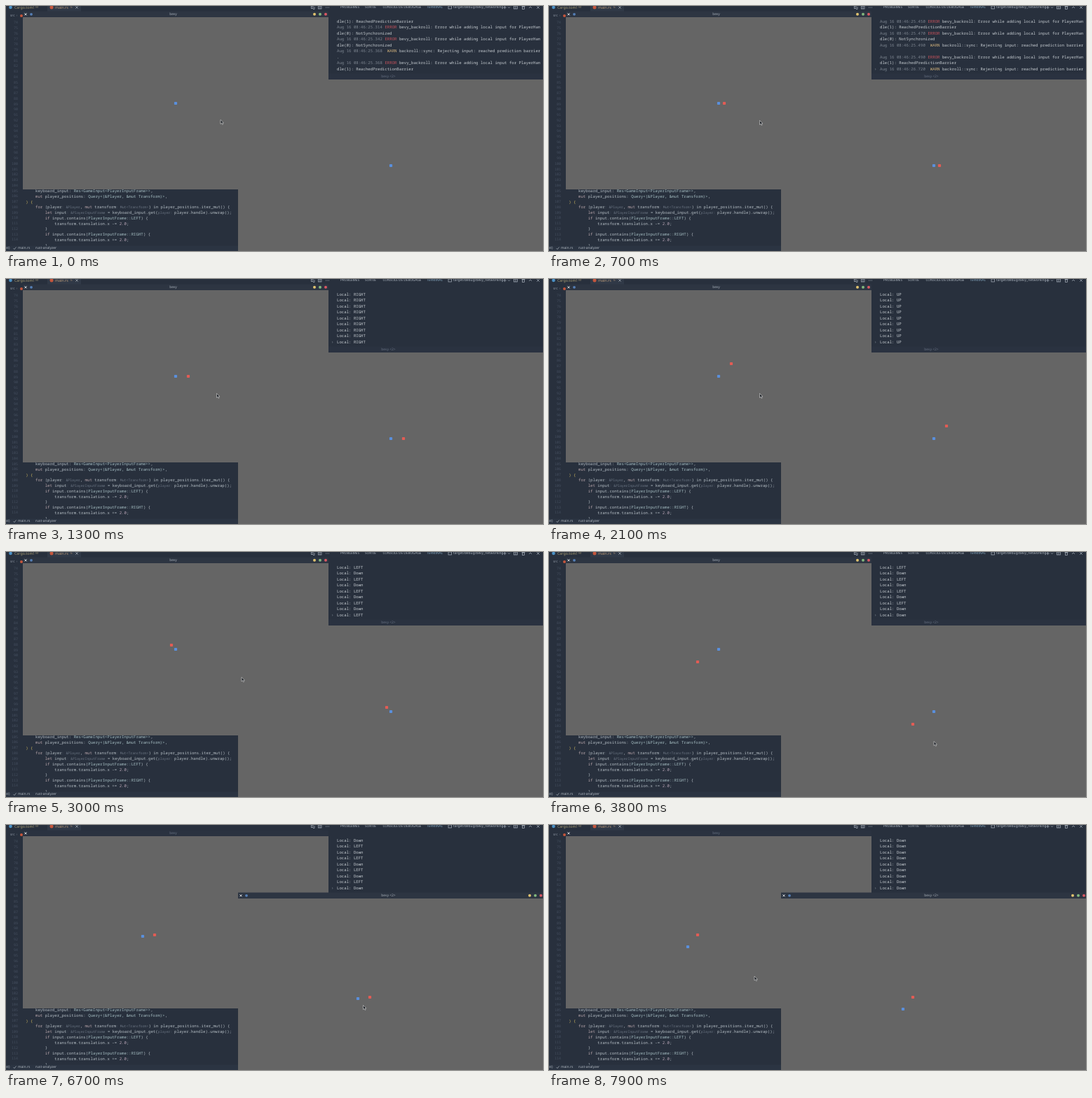
Recreate the animation shown at these times as an HTML page with a canvas. Size 766 by 350 pixels, loop 8 s.

```html
<!DOCTYPE html>
<html lang="en">
<head>
<meta charset="utf-8">
<title>Rollback demo</title>
<style>
html, body { margin: 0; width: 100%; height: 100%; overflow: hidden; background: #28303d; }
canvas { display: block; width: 766px; height: 350px; }
</style>
</head>
<body>
<canvas id="stage"></canvas>
<script>
const W = 766, H = 350, LOOP = 8000, STEP = 100, RAISE = 4000;
const MONO = '"Noto Sans Mono", "DejaVu Sans Mono", monospace';
const SANS = '"Noto Sans", "Open Sans", sans-serif';
const CHAR = 3.42, SIZE = 5.69, HINT = 4.83;
const RED = '#e25c55', BLUE = '#5a8fdc', GRAY = '#656565';
const BG = '#28303d', BAR = '#2a3240', TEXT = '#b4bdc4', DIM = '#6d7785';

const canvas = document.getElementById('stage');
const scale = window.devicePixelRatio || 1;
canvas.width = W * scale;
canvas.height = H * scale;
const ctx = canvas.getContext('2d');
ctx.scale(scale, scale);
ctx.textBaseline = 'middle';
if ('textRendering' in ctx) ctx.textRendering = 'geometricPrecision';

function rect(x, y, w, h, color) {
  ctx.fillStyle = color;
  ctx.fillRect(x, y, w, h);
}
function disc(x, y, r, color) {
  ctx.fillStyle = color;
  ctx.beginPath();
  ctx.arc(x, y, r, 0, 7);
  ctx.fill();
}
function text(str, x, y, color, size = SIZE, family = MONO, align = 'left') {
  ctx.font = size + 'px ' + family;
  ctx.textAlign = align;
  ctx.fillStyle = color;
  ctx.fillText(str, x, y);
}
function label(str, x, y, color, size = 4.7) {
  text(str, x, y, color, size, SANS);
}
function line(points, color, width = 0.7) {
  ctx.strokeStyle = color;
  ctx.lineWidth = width;
  ctx.beginPath();
  points.forEach(([x, y]) => ctx.lineTo(x, y));
  ctx.stroke();
}
function box(x, y, w, h, color) {
  ctx.strokeStyle = color;
  ctx.lineWidth = 0.7;
  ctx.strokeRect(x, y, w, h);
}
function cross(x, y, r, color, width) {
  line([[x - r, y - r], [x + r, y + r]], color, width);
  line([[x - r, y + r], [x + r, y - r]], color, width);
}

// Linear interpolation over [time, ...values] keys
function track(keys, t) {
  let i = 0;
  while (i < keys.length - 2 && t >= keys[i + 1][0]) i++;
  const [a, b] = [keys[i], keys[i + 1]];
  const k = Math.min(1, Math.max(0, (t - a[0]) / (b[0] - a[0])));
  return a.slice(1).map((v, j) => v + (b[j + 1] - v) * k);
}

const redPath = [
  [500, 242, 139], [800, 254, 139], [1100, 254, 139], [1250, 260, 139],
  [1650, 260, 139], [2100, 260, 121], [2400, 260, 121], [2700, 248, 121], [3600, 212, 157]
];
const bluePath = [
  [5000, 242, 139], [5350, 242, 153], [5400, 240, 155],
  [6400, 199, 155], [6500, 195, 159], [7200, 195, 159], [7300, 198, 159], [7700, 198, 174]
];
const cursorPath = [
  [0, 306, 162.5], [400, 300.5, 163.5], [2900, 300.5, 163.5], [3600, 549, 270.5],
  [4100, 549, 270.5], [4600, 509.5, 257.5], [7200, 509.5, 257.5], [7800, 293, 216]
];

// Terminal history
const log = [], marks = [];
const add = (count, ...lines) => { for (let i = 0; i < count; i++) log.push(...lines); };
const mark = time => marks.push([time, log.length]);
const stamp = ms => 'Aug 16 08:46:' + (25 + ms / 1000).toFixed(3) + ' ';
const states = ['NotSynchronized', 'ReachedPredictionBarrier'];
const tail = p => `dle(${p}): ${states[p]}`;
const fail = (ms, p) => add(1,
  [stamp(ms), 'ERROR', ' bevy_backroll: Error while adding local input for PlayerHan'], tail(p));
const warn = ms => add(1,
  [stamp(ms), ' WARN', ' backroll::sync: Rejecting input: reached prediction barrier']);
const press = (count, ...keys) => add(count, ...keys.map(k => 'Local: ' + k));

add(1, tail(1));
fail(314, 0); fail(342, 0); warn(368); add(1, '.'); fail(368, 1);
mark(0);
for (let ms = 394; ms < 440; ms += 26) { fail(ms, 0); warn(ms + 12); add(1, '.'); fail(ms + 12, 1); }
fail(450, 1); fail(470, 0); warn(490); add(1, ''); fail(490, 1);
mark(400);
warn(1720);
mark(600);
mark(1100);
press(9, 'RIGHT');
mark(1300);
mark(1600);
press(27, 'UP');
mark(2100);
mark(2400);
press(17, 'LEFT');
mark(2700);
press(52, 'LEFT', 'Down'); press(1, 'Down');
mark(3600);
mark(5000);
press(20, 'Down');
mark(5300);
press(3, 'LEFT', 'Down');
mark(5400);
press(60, 'LEFT');
mark(6400);
press(6, 'LEFT', 'Down');
mark(6500);
mark(7200);
press(4, 'RIGHT');
mark(7300);
press(22, 'Down');
mark(7700);

function terminal(t) {
  const end = Math.floor(track(marks, t)[0]);
  log.slice(end - 9, end).forEach((row, i) => {
    const y = 22 + i * 8.5;
    if (typeof row === 'string') return text(row, 472, y, '#c5cbd0');
    const [time, level, rest] = row;
    text(time, 472, y, '#7d8590');
    text(level, 472 + 20 * CHAR, y, level === 'ERROR' ? '#c8525c' : '#d2b27c');
    text(rest, 472 + 25 * CHAR, y, '#c5cbd0');
  });
  if (t >= 600) text('›', 464, 90, '#8b95a0');
}

// Code row made of [string, color, size] runs
function code(row, indent, ...runs) {
  let x = 28.3 + indent * CHAR;
  const y = 264.5 + row * 7.75;
  for (const [str, color = TEXT, size = SIZE] of runs) {
    text(str, x, y, color, size);
    x += str.length * CHAR * size / SIZE;
  }
}
const KEY = '#b5a3a9', TYPE = '#a5bdc2', YELLOW = '#c9b45e', NUM = '#b8a5b6';
const hint = str => [str, DIM, HINT];

function editor() {
  rect(0, 0, W, H, BG);
  for (let i = 0; i < 41; i++) {
    text(String(74 + i), 17, 24 + i * 7.75, '#465061', 5, MONO, 'right');
  }
  disc(6.5, 2, 2.3, '#4b91c5');
  label('Cargo.toml', 12, 2, '#a99d73', 5.3);
  label('M', 42, 2, '#8e8569', 4.5);
  rect(59, 0, 48, 8, '#303947');
  disc(65, 2, 2.5, '#c5563c');
  label('main.rs', 70, 2, '#bd9b78', 5.3);
  label('6', 92, 2, '#97806f', 4.6);
  cross(101, 2, 1.7, '#aeb5bd');
  label('src', 6, 14, '#929ba6', 4.8);
  text('›', 14, 14, DIM, 5);
  disc(22, 14, 2, '#c5563c');

  code(0, 4, ['keyboard_input: '], ['Res<GameInput<PlayerInputFrame>>', TYPE], [',']);
  code(1, 4, ['mut', KEY], [' player_positions: '], ['Query<(&Player, &mut Transform)>', TYPE], [',']);
  code(2, 0, [') {', YELLOW]);
  code(3, 4, ['for', KEY], [' (player'], hint(': &Player'), [', '], ['mut', KEY], [' transform'],
    hint(': Mut<Transform>'), [') in player_positions.iter_mut() {']);
  code(4, 8, ['let', KEY], [' input'], hint(': &PlayerInputFrame'), [' = keyboard_input.get('],
    hint('player: '), ['player.handle).unwrap();']);
  [['LEFT', '-='], ['RIGHT', '+=']].forEach(([dir, op], i) => {
    const row = 5 + i * 3;
    code(row, 8, ['if', KEY], [' input.contains('], ['PlayerInputFrame::' + dir, TYPE], [') {']);
    code(row + 1, 12, [`transform.translation.x ${op} `], ['2.0', NUM], [';']);
    code(row + 2, 8, ['}']);
  });
  rect(0, 342.5, 331, 8, '#2b3442');
  label('st)', 0, 346, '#aab2bb', 4.9);
  line([[10.5, 346], [12, 347.6], [14.5, 344.4]], '#aab2bb');
  label('main.rs', 17, 346, '#b4bbc3', 4.9);
  label('rust-analyzer', 42, 346, '#b4bbc3', 4.9);
}

function panelTabs() {
  const c = '#aab3bd';
  box(435.5, 0, 2.4, 3.5, c);
  line([[438, 4.5], [440, 4.5], [440, 1]], c);
  box(445.5, 0, 4.5, 4, c);
  line([[447.8, 0], [447.8, 4]], c);
  [456.5, 458.5, 460.5].forEach(x => disc(x, 2, 0.5, c));
  label('PROBLÈMES', 477, 2, c);
  label('SORTIE', 512, 2, c);
  label('CONSOLE DE DÉBOGAGE', 537.5, 2, c);
  label('TERMINAL', 600, 2, '#7fa0b8');
  box(631, 0, 4.5, 4, c);
  label('target/debug/bevy_networking', 638, 2, c, 4.9);
  line([[709.3, 2], [713.7, 2]], c);
  line([[711.5, 0], [711.5, 4.2]], c);
  line([[716, 1.3], [717.5, 2.8], [719, 1.3]], c);
  box(724.5, 0, 5, 4, c);
  line([[727, 0], [727, 4]], c);
  box(736.5, 1, 3, 3.4, c);
  line([[735.6, 0.5], [740.4, 0.5]], c);
  line([[746, 3], [748, 1], [750, 3]], c);
  cross(759, 2, 1.8, c);
}

function titleBar(x, y, w, name, active) {
  rect(x, y, w, 8.5, active ? '#2d3542' : BAR);
  text(name, x + w / 2 - 3.5, y + 4.3, active ? '#a5adb6' : '#667080', 4.9, SANS, 'center');
  cross(x + 4, y + 4.3, 1.5, '#e1e5e8', 1);
  if (!active) return;
  disc(x + 12, y + 4.3, 1.9, '#557fb6');
  ['#e1c36f', '#82b87e', '#d95863'].forEach((c, i) => disc(x + w - 20 + i * 8, y + 4.3, 2, c));
}

function player([x, y], color) {
  ctx.fillStyle = color;
  ctx.beginPath();
  ctx.roundRect(x - 2.1, y - 2.1, 4.2, 4.2, 0.8);
  ctx.fill();
}

function pointer(x, y) {
  const tip = [[0, 0], [0, 6], [1.5, 4.8], [2.6, 7], [3.6, 6.5], [2.6, 4.4], [4.4, 4.3]];
  ctx.beginPath();
  tip.forEach(([dx, dy]) => ctx.lineTo(x + dx, y + dy));
  ctx.closePath();
  ctx.fillStyle = '#20242a';
  ctx.fill();
  ctx.strokeStyle = '#dadada';
  ctx.lineWidth = 0.6;
  ctx.stroke();
}

function leftWindow(active) {
  titleBar(24, 7.5, 436, 'bevy', active);
  rect(24, 16, 436, 246, GRAY);
}
function rightWindow(active) {
  titleBar(331, 96.5, 436, 'bevy <2>', active);
  rect(331, 105, 435, 245, GRAY);
}

function draw(t) {
  const raised = t >= RAISE;
  editor();
  panelTabs();
  terminal(t);
  if (raised) {
    leftWindow(false);
    rightWindow(true);
  } else {
    rightWindow(false);
    leftWindow(true);
  }
  const red = track(redPath, t), blue = track(bluePath, t);
  for (const [dx, dy] of [[0, 0], [307, 89]]) {
    if (t >= 500) player([red[0] + dx, red[1] + dy], RED);
    player([blue[0] + dx, blue[1] + dy], BLUE);
  }
  pointer(...track(cursorPath, t));
}

const start = performance.now();
function tick() {
  const t = (performance.now() - start) % LOOP;
  draw(Math.floor(t / STEP) * STEP);
  requestAnimationFrame(tick);
}
tick();
</script>
</body>
</html>
```
